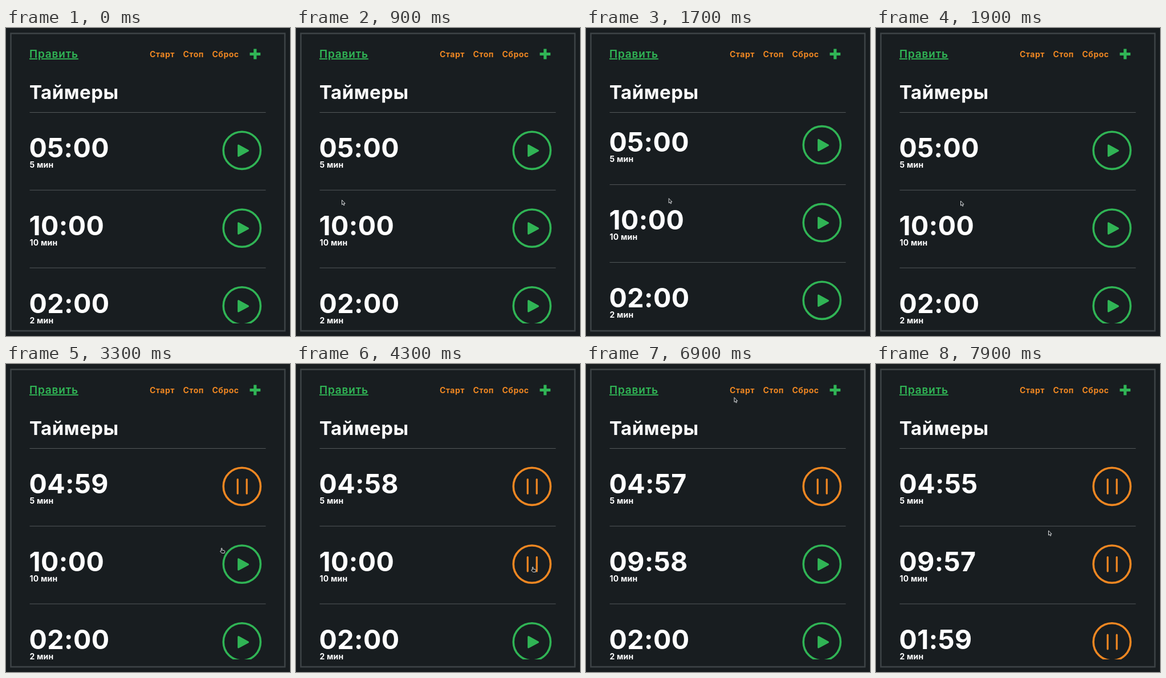
An HTML page for the animation above (8 s loop, 498 by 538 pixels).

```html
<!DOCTYPE html>
<html lang="ru">
<head>
<meta charset="utf-8">
<title>Таймеры</title>
<style>
  html, body { margin: 0; width: 100%; height: 100%; overflow: hidden; background: #181d20; }
  svg { display: block; width: 498px; height: 538px; }
  text { font-family: Inter, "Noto Sans", sans-serif; font-weight: 700; fill: #fff; }
  .edit { font-size: 19px; letter-spacing: .8px; fill: #30b455; font-weight: 600;
          text-decoration: underline 1.5px; text-underline-offset: 2px; text-decoration-skip-ink: none; }
  .nav { font-size: 14px; letter-spacing: .5px; fill: #ef8722; }
  .title { font-size: 33px; letter-spacing: .5px; }
  .time { font-size: 46.5px; letter-spacing: .4px; font-feature-settings: "calt" 0; }
  .label { font-size: 14px; letter-spacing: .2px; }
  .line { stroke: #53585a; }
  .button { color: #30b455; fill: none; stroke: currentColor; stroke-width: 3.6; }
  .button.on { color: #ef8722; }
  .play { fill: currentColor; stroke-width: 3; stroke-linejoin: round; }
  .pause { stroke-linecap: round; stroke-width: 3.2; }
  .on .play, .button:not(.on) .pause { display: none; }
  #cursor path { fill: #14181b; stroke: #d5d8da; stroke-linejoin: round; }
</style>
</head>
<body>
<svg viewBox="0 0 498 538">
  <defs><clipPath id="view"><rect x="30" y="148" width="440" height="368"/></clipPath></defs>
  <rect x="8.5" y="9.5" width="480.5" height="519.5" fill="none" stroke="#3d4346" stroke-width="2.6"/>
  <text class="edit" x="41" y="52">Править</text>
  <text class="nav" x="252" y="51">Старт</text>
  <text class="nav" x="310.5" y="51">Стоп</text>
  <text class="nav" x="361.5" y="51">Сброс</text>
  <path d="M427.5 45.5H446.2M436.8 36.5V54.5" stroke="#30b455" stroke-width="5.2"/>
  <text class="title" x="41" y="123.5">Таймеры</text>
  <path class="line" d="M41.5 147.5H455.5"/>
  <g clip-path="url(#view)"><g id="list"></g></g>
  <g id="cursor">
    <path id="arrow" d="M.5 .5V8.6L2.3 7L3.6 9.8L5 9.2L3.8 6.5H6.2Z"/>
    <path id="hand" d="M-.6 5.2V1Q.2 0 1 1V4.2L5 4.8Q6 5.2 5.7 7L5 9.3H.3L-2.6 6.2Q-2.2 5 -.6 5.9Z"/>
  </g>
</svg>
<script>
  const LOOP = 8000, STEP = 100, MOVE = 500, SCROLL = 37;
  const PITCH = 135.8, BUTTON = { x: 413.8, y: 213.8 };
  const $ = id => document.getElementById(id);

  // toggles flip the button, each tick takes a second off
  const timers = [
    { minutes: 5, toggles: [2500], ticks: [3100, 4000, 5300, 7200, 7800] },
    { minutes: 10, toggles: [4300, 6300, 7100], ticks: [4800, 5300, 7800] },
    { minutes: 2, toggles: [7100], ticks: [7800] }
  ];

  // pointer stops: arrival time, x, y
  const stops = [
    [600, 430, 60], [900, 80, 300], [1200, 116.5, 259.5], [1800, 148, 301.5],
    [2400, 410, 216], [3300, 378, 321], [3700, 415, 354], [5000, 419, 391.5],
    [6200, 415, 354], [6900, 259.5, 58], [7100, 266, 46], [7900, 302, 290.5]
  ];

  const ease = (t, from, to) => {
    const k = Math.min(1, Math.max(0, (t - from) / (to - from)));
    return k * k * (3 - 2 * k);
  };
  const passed = (list, t) => list.filter(ms => ms <= t).length;
  const clock = s => [s / 60 | 0, s % 60].map(n => String(n).padStart(2, '0')).join(':');
  const scrollAt = t => SCROLL * (ease(t, 1500, 1800) - ease(t, 1000, 1200));

  // rest at each stop, then glide so as to arrive at the next one on time
  function pointerAt(t) {
    const next = stops.findIndex(s => s[0] > t);
    if (next < 1) return stops.at(next).slice(1);
    const [left, x, y] = stops[next - 1], [due, nx, ny] = stops[next];
    const k = ease(t, Math.max(left, due - MOVE), due);
    return [x + (nx - x) * k, y + (ny - y) * k];
  }

  function isLink(x, y, scroll) {
    if (y < 148) return y > 37 && y < 55 && x > 251 && x < 448;
    return timers.some((_, i) =>
      Math.abs(x - BUTTON.x) < 37 && Math.abs(y - BUTTON.y - i * PITCH - scroll) < 35);
  }

  $('list').innerHTML = timers.map(({ minutes }, i) => `
    <g transform="translate(0 ${i * PITCH})">
      <text class="time" x="40.5" y="226"></text>
      <text class="label" x="41.5" y="244">${minutes} мин</text>
      <g class="button" transform="translate(${BUTTON.x} ${BUTTON.y})">
        <circle r="32.6"/>
        <path class="play" d="M-6.2 -8.8V9.6L10.7 .5Z"/>
        <path class="pause" d="M-7.6 -12.2V12.4M8.4 -12.2V12.4"/>
      </g>
      <path class="line" d="M41.5 283.2H455.5"/>
    </g>`).join('');
  const times = document.querySelectorAll('.time');
  const buttons = document.querySelectorAll('.button');

  function draw(t) {
    const scroll = scrollAt(t), [x, y] = pointerAt(t), link = isLink(x, y, scroll);
    $('list').setAttribute('transform', `translate(0 ${scroll})`);
    timers.forEach(({ minutes, toggles, ticks }, i) => {
      times[i].textContent = clock(minutes * 60 - passed(ticks, t));
      buttons[i].classList.toggle('on', passed(toggles, t) % 2 === 1);
    });
    $('cursor').style.display = t < stops[0][0] ? 'none' : '';
    $('cursor').setAttribute('transform', `translate(${x} ${y})`);
    $('hand').style.display = link ? '' : 'none';
    $('arrow').style.display = link ? 'none' : '';
  }

  const start = performance.now();
  function tick() {
    const t = (performance.now() - start) % LOOP;
    draw(Math.floor(t / STEP) * STEP);
    requestAnimationFrame(tick);
  }
  tick();
</script>
</body>
</html>
```
